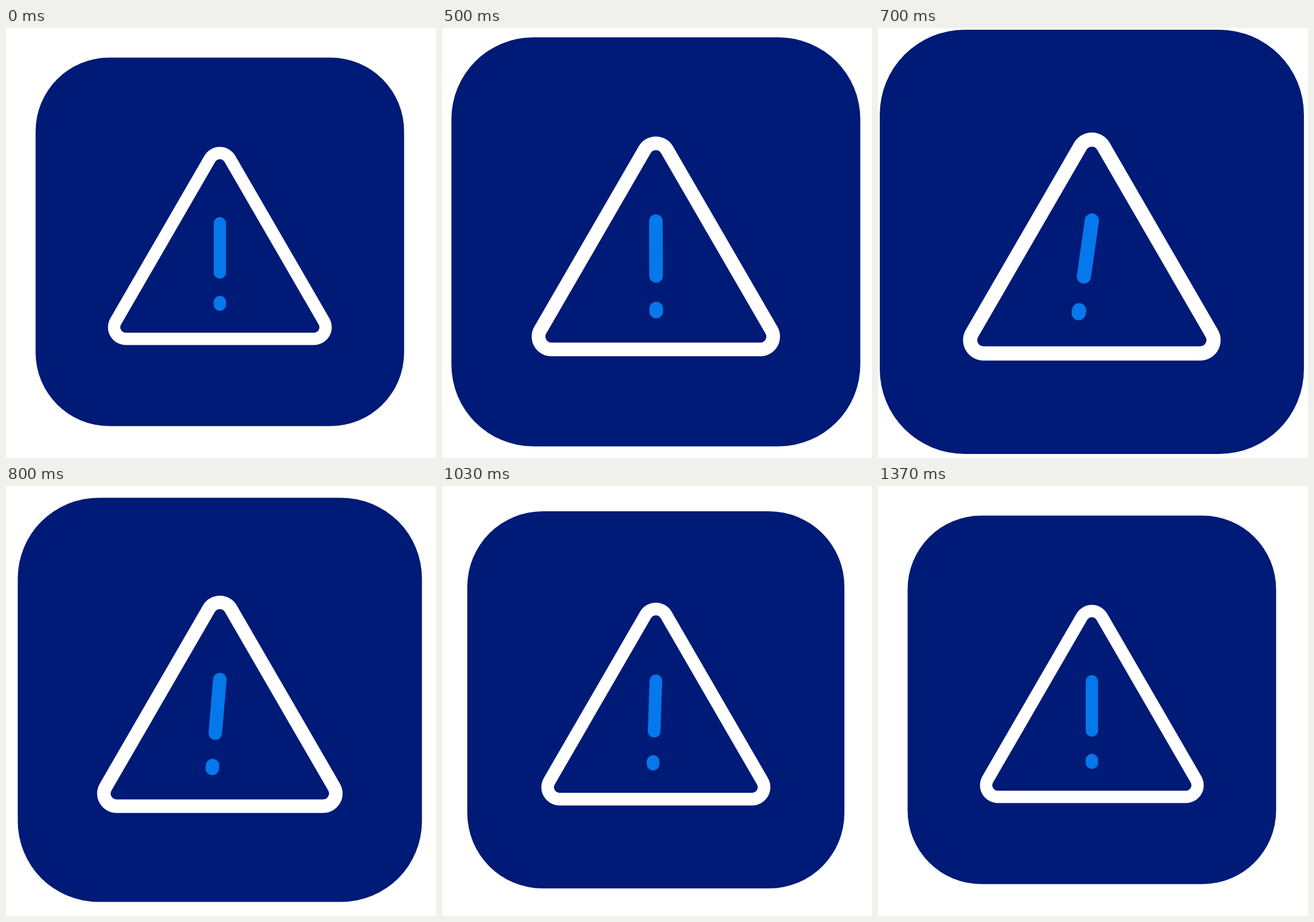
An HTML page that plays this animation: 748x748 px, repeating every 1700 ms.

```html
<!DOCTYPE html>
<html lang="en">
<head>
<meta charset="utf-8">
<title>Warning pulse</title>
<style>
  html, body { margin: 0; width: 100%; height: 100%; overflow: hidden; background: #fff; }
  svg { display: block; width: 100vw; height: 100vh; }
  .tile { fill: #001a77; }
  .sign { fill: none; stroke: #fff; stroke-width: 21.5; }
  .mark { fill: none; stroke: #0578eb; stroke-width: 21.5; stroke-linecap: round; }
</style>
</head>
<body>
<svg viewBox="0 0 748 748">
  <g id="icon">
    <rect class="tile" x="51.5" y="51.5" width="641" height="641" rx="128"/>
    <path class="sign" d="M190.8 510.4 L354.5 227.6 A20.2 20.2 0 0 1 389.5 227.6
      L553.2 510.4 A20.2 20.2 0 0 1 535.7 540.7 H208.3 A20.2 20.2 0 0 1 190.8 510.4 Z"/>
    <path id="mark" class="mark" d="M372 339.8 V425.2 M372 476.8 V481.2"/>
  </g>
</svg>
<script>
const LOOP = 1700, START = 400, HOLD = 470, PEAK = 700, END = 1370;
const GROWTH = 0.151;
const icon = document.getElementById('icon');
const mark = document.getElementById('mark');

// [time, degrees, ease-out power of the way to the next entry]
const SWING = [
  [HOLD - 40, 2, 1], [570, -2.5, 1], [PEAK, 8.1, 1.5],
  [900, 3.1, 1.1], [1030, 1.92, 2], [END, 0, 1]
];

function scaleAt(t) {
  if (t < START || t >= END) return 1;
  if (t < HOLD) return 1.049;
  if (t < PEAK) return 1 + GROWTH * (1 - ((PEAK - t) / 382) ** 2);
  return 1 + GROWTH * ((END - t) / (END - PEAK)) ** 2.75;
}

function angleAt(t) {
  if (t < START || t >= END) return 0;
  if (t < HOLD) return 2;
  const i = SWING.findIndex(key => key[0] > t);
  const [t0, a, power] = SWING[i - 1], [t1, b] = SWING[i];
  return b + (a - b) * ((t1 - t) / (t1 - t0)) ** power;
}

// Poses advance 30 times a second, on times rounded to 10 ms.
function snap(t) {
  return Math.round(Math.floor(t * 0.03 + 0.11) / 0.3) * 10;
}

function draw(now) {
  const t = snap(now % LOOP);
  icon.setAttribute('transform', `translate(372 372) scale(${scaleAt(t)}) translate(-372 -372)`);
  mark.setAttribute('transform', `rotate(${angleAt(t)} 372 339.8)`);
}

const begin = performance.now();
function tick() {
  draw(performance.now() - begin);
  requestAnimationFrame(tick);
}
tick();
</script>
</body>
</html>
```
